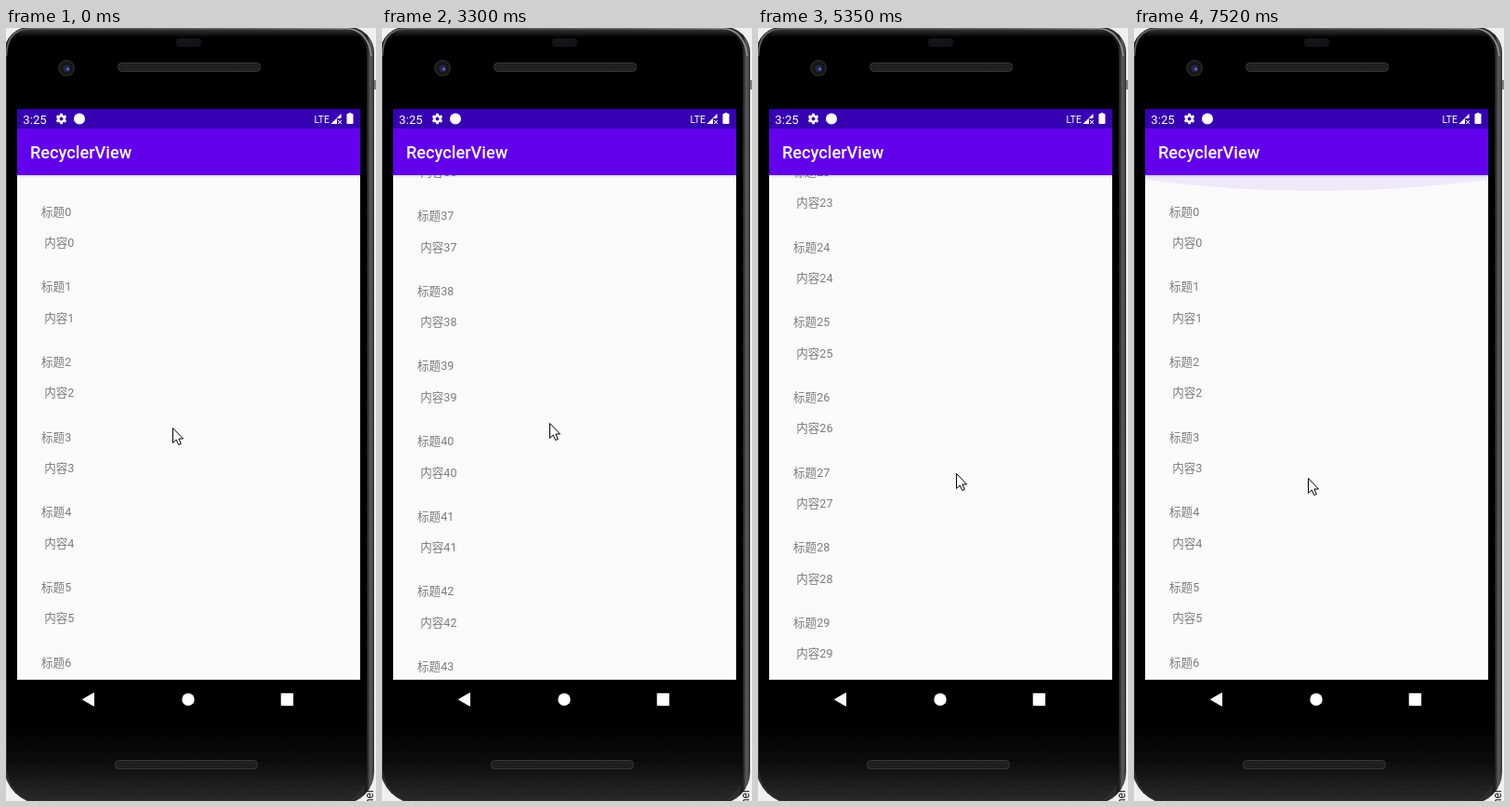
Write an HTML page with a canvas that moves like this. It is 398x830 px and loops after 7.91 s.

```html
<!DOCTYPE html>
<html lang="zh">
<head>
<meta charset="utf-8">
<title>RecyclerView</title>
<style>
html, body { margin: 0; width: 100%; height: 100%; overflow: hidden; background: #f0f0f0; }
canvas { display: block; width: 398px; height: 830px; }
</style>
</head>
<body>
<canvas id="stage"></canvas>
<script>
const W = 398, H = 830, LOOP = 7910;
const PITCH = 80.667, ROWS = 50;
const SCREEN = { x: 12, y: 158, w: 369, h: 542 };
const END = ROWS * PITCH - SCREEN.h;
const UI_FONT = "Roboto, 'Noto Sans CJK SC', 'Noto Sans CJK', sans-serif";

const canvas = document.getElementById("stage");
const dpr = window.devicePixelRatio || 1;
canvas.width = W * dpr;
canvas.height = H * dpr;
const ctx = canvas.getContext("2d");

const HIT_END = 22, LIFT = 28, HIT_TOP = 94;
const poses = [
  { at: 0, scroll: 0, x: 179, y: 429 },
  { at: 18, scroll: 2915, x: 201, y: 358 },
  { at: HIT_END, scroll: END, x: 198, y: 386 },
  { at: LIFT, scroll: END, x: 176, y: 484 },
  { at: 52, scroll: 2269, x: 189, y: 364 },
  { at: 67, scroll: 1898, x: 213, y: 478 },
  { at: 83, scroll: 403.3, x: 214, y: 559 },
  { at: HIT_TOP, scroll: 0, x: 187, y: 483 }
];

// Monotone cubic interpolation of one pose property
function pose(key, n) {
  const last = poses.length - 1;
  if (n >= poses[last].at) return poses[last][key];
  const slope = i => (poses[i + 1][key] - poses[i][key]) / (poses[i + 1].at - poses[i].at);
  const tangent = i => {
    if (i === 0 || i === last) return 0;
    const a = slope(i - 1), b = slope(i);
    return a * b <= 0 ? 0 : 2 * a * b / (a + b);
  };
  let i = 0;
  while (n >= poses[i + 1].at) i++;
  const d = poses[i + 1].at - poses[i].at;
  const u = (n - poses[i].at) / d, u2 = u * u, u3 = u2 * u;
  const mix = 3 * u2 - 2 * u3;
  return poses[i][key] * (1 - mix) + poses[i + 1][key] * mix +
    d * (tangent(i) * (u3 - 2 * u2 + u) + tangent(i + 1) * (u3 - u2));
}

function stepAt(t) {
  if (t < 120) return 0;
  if (t < 2380) return Math.min(LIFT, 1 + Math.floor((t - 115) / 78.15));
  return Math.min(HIT_TOP + 1, LIFT + 1 + Math.floor((t - 2375) / 77.88));
}

function rect(x, y, w, h, fill) {
  ctx.fillStyle = fill;
  ctx.fillRect(x, y, w, h);
}

function paint(fill, stroke) {
  if (fill) { ctx.fillStyle = fill; ctx.fill(); }
  if (stroke) { ctx.strokeStyle = stroke; ctx.stroke(); }
}

function pill(x, y, w, h, r, fill, stroke) {
  ctx.beginPath();
  ctx.roundRect(x, y, w, h, r);
  paint(fill, stroke);
}

function disc(x, y, r, fill) {
  ctx.beginPath();
  ctx.arc(x, y, r, 0, Math.PI * 2);
  paint(fill);
}

function poly(points, fill, stroke) {
  ctx.beginPath();
  points.forEach(([x, y]) => ctx.lineTo(x, y));
  ctx.closePath();
  paint(fill, stroke);
}

function text(str, x, y, size, fill, weight = 400) {
  ctx.font = `${weight} ${size}px ${UI_FONT}`;
  ctx.fillStyle = fill;
  ctx.fillText(str, x, y);
}

function gradient(x0, y0, x1, y1, ...colors) {
  const g = ctx.createLinearGradient(x0, y0, x1, y1);
  colors.forEach((c, i) => g.addColorStop(i / (colors.length - 1), c));
  return g;
}

function speaker(x, y) {
  pill(x + .5, y + .5, 153, 9, 4, "#1e1e1e", "#383838");
  for (let i = 4; i < 150; i += 3) {
    rect(x + i, y + 3, 1, 1, "#303030");
    rect(x + i + 1, y + 6, 1, 1, "#303030");
  }
}

function drawPhone() {
  rect(0, 0, W, H, "#f0f0f0");
  rect(390, 56, 8, 10, gradient(390, 0, 398, 0, "#444", "#888"));

  // Metal rim, then the glass with its lit top and bottom edges
  pill(-2, -1, 398, 834, [27, 27, 34, 40],
    gradient(384, 0, 396, 0, "#2c2c2c", "#181818", "#5c5c5c", "#333"));
  pill(1, 1, 387, 830, [25, 25, 33, 38], "#000");
  ctx.save();
  ctx.clip();
  rect(0, 0, W, 10, gradient(0, 0, 0, 10, "#3c3c3c", "#000"));
  rect(0, 745, W, 85, gradient(0, 745, 0, 830, "#000", "#0c0c0c", "#2a2a2a"));
  ctx.restore();

  ctx.lineWidth = 1.5;
  ctx.strokeStyle = gradient(0, 0, 397, 0, "#666", "#555", "#666", "#999");
  ctx.beginPath();
  ctx.moveTo(.5, 30);
  ctx.quadraticCurveTo(1, .7, 27, .7);
  ctx.lineTo(366, .7);
  ctx.quadraticCurveTo(389, 1, 393, 30);
  ctx.stroke();
  ctx.lineWidth = 1;

  pill(183, 11, 27, 9, 4, "#141416");
  disc(65, 43, 9, "#252528");
  disc(65, 43, 7, "#151518");
  disc(65.5, 43.5, 4, "#25254a");
  disc(66.5, 44, 1.6, "#6a6ab0");
  speaker(120, 37);
  speaker(117, 786);

  ctx.save();
  ctx.translate(395, 834);
  ctx.rotate(-Math.PI / 2);
  text("her", 0, 0, 12, "#222");
  ctx.restore();
}

function drawGear(x, y) {
  for (let i = 0; i < 6; i++) {
    ctx.save();
    ctx.translate(x, y);
    ctx.rotate(i * Math.PI / 3);
    rect(-1.5, -5.7, 3, 3, "#fff");
    ctx.restore();
  }
  disc(x, y, 4.3, "#fff");
  disc(x, y, 1.9, "#3700b3");
}

function drawBars() {
  rect(12, 87, 369, 21, "#3700b3");
  rect(12, 108, 369, 50, "#6200ee");
  text("3:25", 18.3, 102.5, 13.2, "#fff");
  drawGear(59.5, 97.5);
  disc(79, 97.5, 6, "#fff");
  text("LTE", 331.5, 101.5, 10.5, "#fff");
  poly([[349.5, 103], [360.5, 92], [360.5, 97], [356, 97], [356, 103]], "#fff");
  poly([[357.2, 99], [361, 103]], null, "#fff");
  poly([[361, 99], [357.2, 103]], null, "#fff");
  rect(368.5, 91, 3, 2, "#fff");
  pill(366.5, 92, 7, 11, 1, "#fff");
  text("RecyclerView", 26, 140.3, 18.15, "#fff", 500);
}

function drawNav() {
  rect(12, 700, 369, 45, "#000");
  ctx.lineJoin = "round";
  poly([[82.5, 721], [94.5, 714], [94.5, 728]], "#fff", "#fff");
  disc(196, 721, 6.7, "#fff");
  pill(295.7, 714.3, 13.4, 13.4, 1, "#fff");
}

function drawGlow(base, dir, depth, alpha) {
  const edge = depth - 12, { x, w } = SCREEN;
  ctx.beginPath();
  ctx.moveTo(x, base);
  ctx.lineTo(x, base + dir * edge);
  ctx.quadraticCurveTo(x + w / 2, base + dir * (edge + 24), x + w, base + dir * edge);
  ctx.lineTo(x + w, base);
  paint(`rgba(98, 0, 238, ${.072 * alpha})`);
}

function drawEdges(n) {
  const { y, h } = SCREEN;
  if (n >= HIT_TOP) drawGlow(y, 1, 24 - 7 * (n - HIT_TOP), 1);
  if (n < HIT_END || n > LIFT + 4) return;
  const u = Math.min(1, (n - HIT_END) / (LIFT - HIT_END));
  const fade = 1 - Math.max(0, n - LIFT) / 5;
  drawGlow(y + h, -1, 16 + 3 * u + 7 * Math.sin(Math.PI * u), fade);
}

function drawList(n) {
  const { x, y, w, h } = SCREEN;
  const scroll = pose("scroll", n);
  ctx.save();
  ctx.beginPath();
  ctx.rect(x, y, w, h);
  ctx.clip();
  rect(x, y, w, h, "#fafafa");
  const first = Math.floor(scroll / PITCH);
  for (let i = first; i < Math.min(ROWS, first + 8); i++) {
    const top = y + i * PITCH - scroll;
    text("标题" + i, 38, Math.round(top + 43.5), 12.57, "#7c7c7c");
    text("内容" + i, 41.2, Math.round(top + 77.1), 12.57, "#7c7c7c");
  }
  drawEdges(n);
  rect(x, y, w, 3, gradient(0, y, 0, y + 3, "rgba(0,0,0,.14)", "rgba(0,0,0,0)"));
  rect(x, y + h - 1, w, 1, "#c8c8c8");
  ctx.restore();
}

function drawPointer(n) {
  ctx.save();
  ctx.translate(Math.round(pose("x", n)) + .5, Math.round(pose("y", n)) + .5);
  ctx.lineJoin = "miter";
  poly([[0, 0], [0, 16], [3.7, 12.5], [6.2, 18], [8.8, 17], [6.4, 11.5], [11, 11.5]],
    "#fff", "#000");
  ctx.restore();
}

function draw(t) {
  const n = stepAt(t);
  ctx.setTransform(dpr, 0, 0, dpr, 0, 0);
  ctx.lineWidth = 1;
  drawPhone();
  drawBars();
  drawList(n);
  drawNav();
  drawPointer(n);
}

const start = performance.now();
function tick() {
  draw((performance.now() - start) % LOOP);
  requestAnimationFrame(tick);
}
tick();
</script>
</body>
</html>
```
